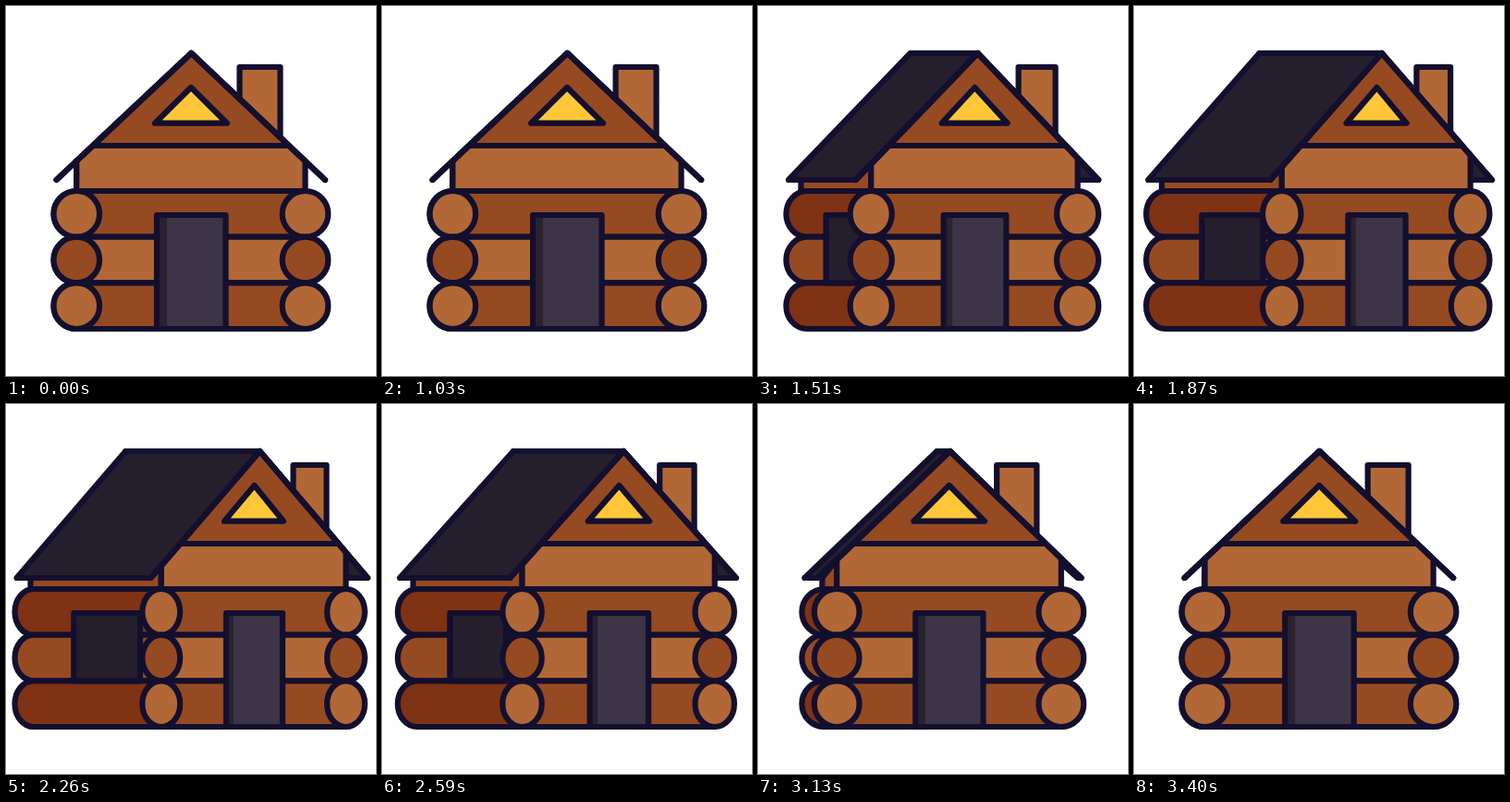
An HTML page with a canvas that plays this animation: 400 by 400 pixels, repeating every 3430 ms.

```html
<!DOCTYPE html>
<html lang="en">
<head>
<meta charset="utf-8">
<title>Log cabin</title>
<style>
html, body { margin: 0; width: 100%; height: 100%; overflow: hidden; background: #fff; }
canvas { display: block; width: 400px; height: 400px; }
</style>
</head>
<body>
<canvas id="stage"></canvas>
<script>
const LOOP = 3430;
const INK = '#130f2e', LIGHT = '#b16836', BROWN = '#964a22', DEEP = '#803214',
      SLATE = '#251f2d', DOOR = '#3d3447', JAMB = '#2a232f', GLOW = '#ffc738';
const ROWS = [200, 249.7, 299.3, 349];

const canvas = document.getElementById('stage');
const ctx = canvas.getContext('2d');
const dpr = window.devicePixelRatio || 1;
canvas.width = canvas.height = 400 * dpr;
ctx.scale(dpr, dpr);
ctx.lineJoin = ctx.lineCap = 'round';
ctx.lineWidth = 6.2;
ctx.strokeStyle = INK;

// cubic-bezier(.4, 0, .4, 1)
function ease(x) {
  if (x <= 0) return 0;
  if (x >= 1) return 1;
  let lo = 0, hi = 1;
  for (let i = 0; i < 24; i++) {
    const u = (lo + hi) / 2;
    if (1.2 * u * (1 - u) + u * u * u < x) lo = u; else hi = u;
  }
  return lo * lo * (3 - 2 * lo);
}

// 0 = seen from the front, 1 = turned fully to show the side
const turnAt = t => ease((t - 1000) / 1200) - ease((t - 2290) / 1180);

function paint(fill, stroke) {
  if (fill) { ctx.fillStyle = fill; ctx.fill(); }
  if (stroke) ctx.stroke();
}

function poly(points, fill, stroke = true) {
  ctx.beginPath();
  points.forEach(([x, y]) => ctx.lineTo(x, y));
  ctx.closePath();
  paint(fill, stroke);
}

function box(x1, y1, x2, y2, fill, stroke = true) {
  poly([[x1, y1], [x2, y1], [x2, y2], [x1, y2]], fill, stroke);
}

function line(...points) {
  ctx.beginPath();
  points.forEach(([x, y]) => ctx.lineTo(x, y));
  ctx.stroke();
}

function logEnd(cx, i, rx, fill) {
  const top = ROWS[i], bottom = ROWS[i + 1];
  ctx.beginPath();
  ctx.ellipse(cx, (top + bottom) / 2, rx, (bottom - top) / 2, 0, 0, Math.PI * 2);
  paint(fill, true);
}

function sideLog(left, right, i, rx, fill) {
  const top = ROWS[i], bottom = ROWS[i + 1];
  ctx.beginPath();
  ctx.moveTo(right, top);
  ctx.lineTo(left + rx, top);
  ctx.ellipse(left + rx, (top + bottom) / 2, rx, (bottom - top) / 2, 0, -Math.PI / 2, Math.PI / 2, true);
  ctx.lineTo(right, bottom);
  paint(fill, true);
}

function draw(p) {
  const apex = [200.3 + 74 * p, 51], backApex = [200.3 - 71 * p, 51];
  const eaveL = [54.5 + 102 * p, 188], eaveR = [345 + 46 * p, 188];
  const backL = [54.5 - 43 * p, 188], backR = [345 + 5 * p, 188];
  const wallL = 76.3 + 91.5 * p, wallR = 323.5 + 44 * p;
  const sideX = Math.max(66.5 - 40 * p, 76.3 - 71 * p);
  const rx = 24.8 - 4.4 * p;

  const onSlope = (eave, x) => 51 + 137 * (x - apex[0]) / (eave[0] - apex[0]);
  const slopeX = (eave, y) => apex[0] + (eave[0] - apex[0]) * (y - 51) / 137;
  const yL = onSlope(eaveL, wallL), yR = onSlope(eaveR, wallR);

  ctx.fillStyle = '#fff';
  ctx.fillRect(0, 0, 400, 400);

  // far roof slope and chimney
  poly([apex, eaveR, backR, backApex], SLATE);
  const chL = 252.5 + 58 * p, chR = 296.5 + 50 * p;
  poly([[chL, 66], [chR, 66], [chR, onSlope(eaveR, chR)], [chL, onSlope(eaveR, chL)]], LIGHT);

  // side wall
  poly([[sideX, 188], [wallL, yL], [wallL, 200], [sideX, 200]], BROWN);
  [DEEP, BROWN, DEEP].forEach((c, i) => sideLog(51.5 - 42 * p, wallL, i, rx, c));
  box(73.8 - 0.5 * p, 226, 83 + 62 * p, ROWS[2], SLATE);

  // front wall
  poly([[wallL, 200], [wallL, yL], apex, [wallR, yR], [wallR, 200]], LIGHT);
  poly([apex, [slopeX(eaveR, 151), 151], [slopeX(eaveL, 151), 151]], BROWN);
  [BROWN, LIGHT, BROWN].forEach((c, i) => box(wallL, ROWS[i], wallR, ROWS[i + 1], c));
  [LIGHT, BROWN, LIGHT].forEach((c, i) => {
    logEnd(wallL, i, rx, c);
    logEnd(wallR, i, rx, c);
  });

  // door and attic window
  const doorL = 163 + 75 * p, doorR = 237.5 + 61.5 * p;
  box(doorL, 226, doorR, 349, DOOR, false);
  box(doorL, 226, doorL + 11 - 3 * p, 349, JAMB, false);
  box(doorL, 226, doorR, 349);
  poly([[200 + 68.5 * p, 88], [239 + 61 * p, 126.7], [161 + 75 * p, 126.7]], GLOW);

  // near roof slope
  poly([backApex, apex, eaveL, backL], SLATE);
  line(eaveL, apex, eaveR);
}

const start = performance.now();
function tick() {
  draw(turnAt((performance.now() - start) % LOOP));
  requestAnimationFrame(tick);
}
tick();
</script>
</body>
</html>
```
